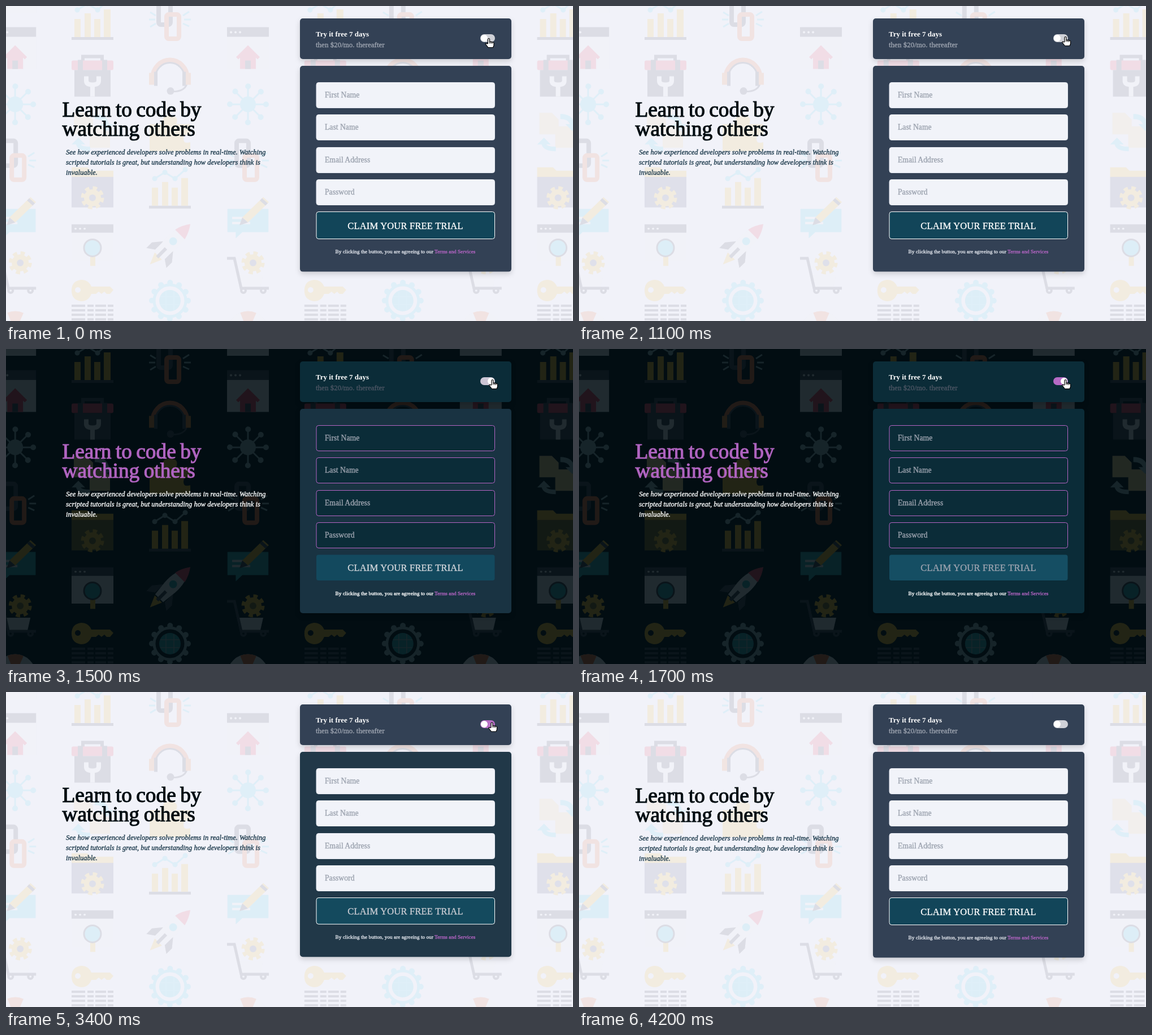
Recreate the animation shown at these times as an HTML page. Size 1003 by 558 pixels, loop 5400 ms.

```html
<!DOCTYPE html>
<html lang="en">
<head>
<meta charset="utf-8">
<title>Sign-up form with theme switch</title>
<style>
html, body { margin: 0; width: 100%; height: 100%; overflow: hidden; }
svg { display: block; width: 1003px; height: 558px; background: #f1f2f9; font-family: "Liberation Serif", "Times New Roman", serif; }
#icons { opacity: .12; }
.card { fill: #334155; filter: drop-shadow(0 4px 5px rgba(0,0,0,.16)); }
.field { fill: #f1f3f9; stroke: #e6e9f1; }
.med { stroke: currentColor; stroke-width: .35px; fill: currentColor; }
.title { font-size: 37.3px; word-spacing: -1.9px; stroke-width: 1.1px; color: #010c11; }
.lead { font-size: 12.48px; font-style: italic; color: #1d3a4c; }
.sub { font-size: 13px; color: #9ca3af; }
.hint { font-size: 13.7px; color: #9ca3af; }
.terms { font-size: 9.28px; color: #dfe3ea; }
.link { color: #b565c4; }
.cursor { fill: #fff; stroke: #000; stroke-width: 1.2; stroke-linejoin: round; }
/* icon palette */
.k { fill: #484854; } .y { fill: #fdc02f; } .r { fill: #f24a62; } .o { fill: #f78a3a; }
.t { fill: #4fd6ee; } .w { fill: #f0f0f4; } .c { fill: #fbdc96; } .b { fill: #5c637c; }
.sk, .si, .so, .sw { fill: none; }
.sk { stroke: #484854; } .si { stroke: #62d8f2; } .so { stroke: #f7743f; } .sw { stroke: #f0f0f4; }
.i { fill: #62d8f2; }
/* dark theme */
.dark { background: #020d12; }
.dark #icons { opacity: .13; }
.dark .card { fill: #0b2c38; }
.dark .field { fill: #0b2c38; stroke: #b565c4; }
.dark .title { color: #b064c0; }
.dark .lead, .dark .terms { color: #fff; }
.dark .link { color: #b565c4; }
.dark .sub { color: #4b5563; }
.dark .t { fill: #35aebb; }
.dark .i { fill: #a3bfc6; }
.dark .si { stroke: #a3bfc6; }
.dark .b { fill: #80702c; }
</style>
</head>
<body>
<svg id="stage" viewBox="0 0 1003 558">
<defs>
  <g id="chart">
    <path class="k" d="M-37 31h74v5h-74z"/>
    <path class="y" d="M-32-1h11v32h-11zM-14-11h11v42h-11zM3-1h11v32H3zM20-18h12v49H20z"/>
    <path class="si" stroke-width="3" d="M-27-17L-9-28 9-17 27-33"/>
    <path class="si" stroke-width="9" stroke-linecap="round" d="M-27-17h.1M-9-28h.1M9-17h.1M27-33h.1"/>
  </g>
  <g id="toolbox">
    <path class="sk" stroke-width="6" d="M-17-24v-10h34v10"/>
    <rect class="r" x="-37" y="-27" width="74" height="17" rx="3"/>
    <path class="k" d="M-32-10h64v47h-64zM-26-28h9v22h-9zM17-28h9v22h-9z"/>
    <path class="sw" stroke-width="8" d="M-11 1v8q0 7 11 7t11-7V1M0 16v21"/>
  </g>
  <g id="sync">
    <path class="c" d="M-36-34h22l12 12v26h-34zM-8-10H16l12 12v26H-8z" transform="translate(3)"/>
    <path class="i" d="M4-32q22 0 25 18h8l-12 12-12-12h8q-3-9-17-9zM-4 34q-22 0-25-12h-8l12-12 12 12h-8q3 4 17 4z"/>
  </g>
  <g id="cog">
    <circle class="y" r="15"/>
    <circle r="17" fill="none" stroke="#fdc02f" stroke-width="7" stroke-dasharray="7.35 6"/>
    <circle class="b" r="6"/>
  </g>
  <g id="folder">
    <path class="y" d="M-37-37h28l6 6h40v13h-74z"/>
    <path class="b" d="M-37-20h74v54h-74z"/>
    <use href="#cog" y="17"/>
  </g>
  <g id="window">
    <path class="w" d="M-37-20h74v57h-74z"/>
    <path class="k" d="M-37-37h74v17h-74z"/>
    <path class="sw" stroke-width="4" stroke-linecap="round" d="M-30-28h.1M-22-28h.1M-14-28h.1"/>
  </g>
  <g id="search">
    <use href="#window" transform="scale(1 .87)" y="-4"/>
    <path class="y" d="M-4 18h9v20h-9z"/>
    <circle class="t" cy="6" r="15"/>
    <circle class="sk" cy="6" r="15" stroke-width="3"/>
  </g>
  <g id="house">
    <use href="#window"/>
    <path class="r" d="M0-5L21 16 17 20 14 17V37H-14V17L-17 20-21 16z"/>
    <path class="k" d="M-5 22H5v15H-5z"/>
  </g>
  <g id="key">
    <path class="y" fill-rule="evenodd" d="M-20-37q13 0 18 12H31l6 6-6 7h-6l-4-4-5 4-5-4-5 4H-2q-5 13-18 13-17-2-17-19t17-19zM-26-24a5 5 0 1 0 .1 0z"/>
    <path class="sk" stroke-width="4" stroke-dasharray="24 4 11 3 19 3 10 3" d="M-37 9h74M-37 17h74M-37 25h74M-37 33h74"/>
  </g>
  <g id="chain" stroke-width="8">
    <rect class="sk" x="-20" y="-35" width="21" height="44" rx="4"/>
    <rect class="so" x="-6" y="-9" width="22" height="43" rx="4"/>
    <path class="si" stroke-width="3" d="M23-7l11-7M25 0h12M23 7l11 5M-25-7l-10-6M-26 0h-11M-25 7l-10 6"/>
  </g>
  <g id="headset">
    <path class="so" stroke-width="8" d="M-31 5a31 33 0 0 1 62 0"/>
    <path class="sk" stroke-width="3" d="M-26 4a26 27 0 0 1 52 0M30 14q-4 14-25 14"/>
    <path class="o" d="M-37-5h9v21h-9zM28-5h9v21h-9z"/>
    <path class="k" d="M-28-7h6v25h-6zM22-7h6v25h-6z"/>
    <circle class="k" cx="1" cy="27" r="6.5"/>
  </g>
  <g id="piece"><path class="y" d="M-36-14h25q-6-15 11-15t11 15h25v20q-12-4-12 6t12 6v16h-72z"/></g>
  <g id="rocket" transform="rotate(45)">
    <path class="k" d="M-12 4L-25 20v14l13-9zM12 4l13 16v14l-13-9z"/>
    <path class="w" d="M0-50q15 22 13 50l-3 27h-20l-3-27q-2-28 13-50z"/>
    <path class="r" d="M0-51q9 12 12 26h-24q3-14 12-26z"/>
    <path class="y" d="M-9 29H9L0 50z"/>
    <circle class="t" cy="-8" r="7"/>
    <path class="k" d="M-3 10h6v22h-6z"/>
  </g>
  <g id="globe">
    <circle class="si" r="28" stroke-width="5"/>
    <circle class="si" r="32" stroke-width="10" stroke-linecap="round" stroke-dasharray=".1 16.65"/>
    <circle class="t" r="19"/>
    <path class="si" stroke-width="1.5" d="M-17-7h34M-17 7h34M-7-17v34M7-17v34"/>
  </g>
  <g id="network">
    <circle class="i" r="14"/>
    <path class="si" stroke-width="3" d="M-32 0h64M0-32v64M-23-23l46 46M23-23l-46 46"/>
    <circle class="si" r="32" stroke-width="10" stroke-linecap="round" stroke-dasharray=".1 25.03"/>
  </g>
  <g id="note">
    <path class="t" d="M-37-14h74v41h-47l-12 11v-11h-15z" transform="scale(.98 1)"/>
    <path class="sw" stroke-width="4" d="M-28 2h26M-28 11h32"/>
    <path class="y" d="M-10 1L27-35 37-26 0 10z"/>
    <path class="k" d="M-10 1L0 10-15 15zM21-29l4-4 10 9-4 4z"/>
  </g>
  <g id="cart">
    <path class="w" d="M-18 3h45l-5 22h-36z"/>
    <use href="#cog" x="9" y="-18"/>
    <path class="sk" stroke-width="5" d="M-37-26h13l12 53h49"/>
    <circle class="sk" cx="-8" cy="31" r="4" stroke-width="4"/>
    <circle class="sk" cx="27" cy="31" r="4" stroke-width="4"/>
  </g>
  <g id="buoy">
    <circle class="sw" r="27" stroke-width="20"/>
    <circle class="so" r="27" stroke-width="20" stroke-dasharray="21.2" stroke-dashoffset="10.6"/>
  </g>
  <g id="tile"></g>
</defs>

<g id="icons"></g>

<g id="left">
  <text class="med title" x="99.5" y="196">Learn to code by</text>
  <text class="med title" x="99.5" y="230">watching others</text>
  <text class="lead med" x="106" y="263">See how experienced developers solve problems in real-time. Watching</text>
  <text class="lead med" x="106" y="281">scripted tutorials is great, but understanding how developers think is</text>
  <text class="lead med" x="106" y="299">invaluable.</text>
</g>

<rect class="card" x="520" y="22" width="374" height="72" rx="5"/>
<text x="548" y="54" font-size="13" font-weight="bold" fill="#fff">Try it free 7 days</text>
<text class="sub med" x="548" y="72.5">then $20/mo. thereafter</text>
<rect id="track" x="839" y="50" width="26" height="14" rx="7"/>
<circle id="knob" cy="57" r="6" fill="#fff"/>

<rect id="panel" class="card" x="520" y="106" width="374" rx="5"/>
<g id="fields"></g>
<rect id="btn" x="549" y="364.5" width="315.5" rx="4"/>
<text id="btnText" class="med" x="706.5" text-anchor="middle" font-size="16.5" letter-spacing=".2">CLAIM YOUR FREE TRIAL</text>
<text id="terms" class="terms med" x="706.5" text-anchor="middle">By clicking the button, you are agreeing to our <tspan class="link med">Terms and Services</tspan></text>

<path id="arrow" class="cursor" d="M0 0v16l4-4 3 6 2.7-1.2-3-5.8h5z"/>
<g id="hand" class="cursor">
  <path d="M-1.5 9V1.5a1.5 1.5 0 0 1 3 0V6q1.3-1 2.4.3 1.3-.8 2.3.4 2-.5 2.8 1.2v4.5l-1.5 3.6h-8.5l-4.7-6q.3-2.4 2.7-.6z"/>
  <path d="M1.5 6v3M3.9 6.5v2.7M6.2 7v2.3" stroke-width="1"/>
</g>
</svg>

<script>
const $ = id => document.getElementById(id);
const use = (id, x, y) => `<use href="#${id}" x="${x}" y="${y}"/>`;

// Three staggered columns of icons, repeated across the stage
const columns = [
  [153, 24, ["chart", "toolbox", "sync", "folder", "search", "key"]],
  [290, 24, ["chain", "headset", "piece", "chart", "rocket", "globe"]],
  [428, -25, ["window", "house", "network", "chain", "note", "cart", "buoy"]]
];
$("tile").innerHTML = columns.map(([x, y, names]) =>
  names.map((name, i) => use(name, x, y + i * 99.6 + (name === "buoy" ? 5 : 0))).join("")).join("");
$("icons").innerHTML = [-1, 0, 1, 2].map(i => use("tile", i * 411.8, 0)).join("");

$("fields").innerHTML = ["First Name", "Last Name", "Email Address", "Password"].map((label, i) => {
  const y = Math.round(134.6 + i * 57.6) + .5;
  return `<rect class="field" x="549" y="${y}" width="315.5" height="45" rx="4"/>
    <text class="hint med" x="564" y="${y + 26.8}">${label}</text>`;
}).join("");

const LOOP = 5400, ON = 1500, OFF = 3400;
// Cursor stops: start time, x, y, shape
const stops = [
  [0, 854, 57.5, "hand"], [300, 806, 74, "arrow"], [400, 738, 86, "arrow"], [500, 780, 74, "arrow"],
  [600, 826, 55, "arrow"], [700, 850, 55, "hand"], [800, 862, 55.5, "hand"], [1100, 860.5, 54.5, "hand"],
  [2100, 859.5, 54, "hand"], [3700, 800, 50, "arrow"], [3800, 708, 40, "arrow"],
  [4100, 559, 12, "arrow"], [4200, 0, 0, ""]
];

const smooth = x => { x = Math.min(1, Math.max(0, x)); return x * x * (3 - 2 * x); };
const mix = (a, b, p) => `rgb(${a.map((v, i) => Math.round(v + (b[i] - v) * p))})`;
const set = (id, attrs) => { for (const k in attrs) $(id).setAttribute(k, attrs[k]); };

function draw(time) {
  const t = Math.floor(time % LOOP / 100) * 100;
  const dark = t >= ON && t < OFF;
  const fade = lead => t < ON ? 0 : dark ? smooth((t - ON + lead) / 300) : 1 - smooth((t - OFF + lead) / 300);
  const edge = dark ? 0 : 1 - fade(150);

  $("stage").classList.toggle("dark", dark);
  set("left", { transform: `translate(0 ${-1.6 * (1 - edge)})` });
  set("panel", { height: 362 + 2.6 * edge });
  $("panel").style.fill = mix([51, 65, 85], [11, 44, 56], fade(dark ? 180 : 160));
  set("btn", { height: 45.5 + 2.5 * edge });
  $("btn").style.fill = mix([18, 69, 89], [21, 78, 99], fade(140));
  $("btn").style.stroke = dark ? "none" : "#fff";
  set("btnText", { y: 392.7 + 2 * edge });
  $("btnText").style.color = mix([255, 255, 255], [156, 163, 175], fade(140));
  set("terms", { y: 435.5 + 2.6 * edge });

  $("track").style.fill = mix([207, 209, 215], [181, 101, 196], fade(60));
  set("track", { stroke: t === 1400 ? "#05080b" : "none", "stroke-width": 1.5 });
  set("knob", { cx: dark ? 858 : 846 });

  const [, x, y, shape] = stops.filter(s => s[0] <= t).pop();
  for (const id of ["arrow", "hand"])
    set(id, { transform: `translate(${x} ${y})`, visibility: id === shape ? "visible" : "hidden" });
}

const start = performance.now();
function tick() {
  draw(performance.now() - start);
  requestAnimationFrame(tick);
}
tick();
</script>
</body>
</html>
```
